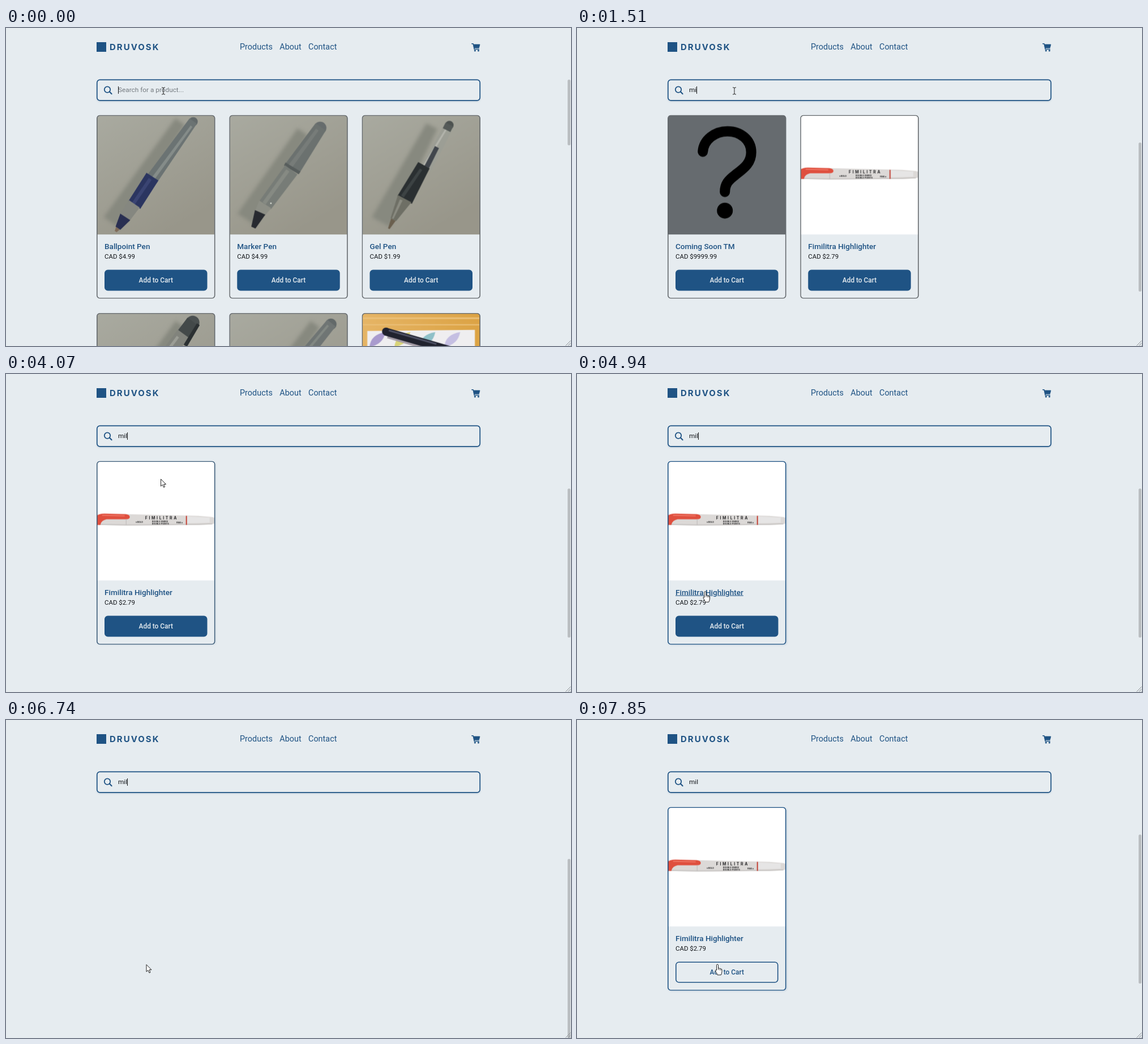
Write an HTML page with a canvas that moves like this. It is 998 px wide and 561 px high and loops after 8 s.

```html
<!DOCTYPE html>
<html lang="en">
<head>
<meta charset="utf-8">
<title>Pen shop search</title>
<style>
  :root { --bg: #e6ecf0; --blue: #1f5384; --grey: #656a6e; }
  html, body { margin: 0; width: 100%; height: 100%; overflow: hidden; background: var(--bg); }
  body { position: relative; font-family: Roboto, Arial, sans-serif; color: #111418; }
  body > *, .card > * { position: absolute; white-space: nowrap; }
  .mark { left: 160px; top: 25px; width: 17px; height: 17px; background: var(--blue); }
  .brand { left: 183px; top: 24px; font: 700 15px/20px Inter, sans-serif; letter-spacing: 2px; color: var(--blue); }
  nav { left: 413px; top: 24px; font-size: 14.45px; line-height: 20px; color: var(--blue); }
  nav span { margin-right: 12.3px; float: left; }
  .search { left: 160px; top: 91px; width: 678px; height: 37px; border-radius: 6px; box-shadow: 0 2px 3px rgba(31, 83, 132, .16); }
  .field { left: 198px; top: 103px; height: 13px; display: flex; align-items: center; font-size: 11.8px; line-height: 13px; }
  .caret { width: 1px; height: 13px; margin-right: -1px; background: #111; }
  .hint { color: #757b80; }
  .card { left: 0; top: 0; width: 209.5px; height: 324px; border-radius: 6px; }
  .card canvas { left: 1px; top: 1px; border-radius: 5px 5px 0 0; }
  .name { left: 14px; top: 220.5px; font-size: 13.56px; font-weight: 500; line-height: 20px; color: var(--blue); }
  .price { left: 14px; top: 238.5px; font-size: 11.43px; line-height: 20px; }
  .add { left: 14px; width: 181.5px; top: 273px; color: var(--bg); font-size: 11.88px; font-weight: 500; line-height: 36px; text-align: center; }
  .edge { fill: none; stroke: var(--grey); stroke-width: 1.6; }
  .button { fill: var(--blue); stroke: var(--blue); stroke-width: 1.6; }
  .thumb { left: 992px; width: 5px; border-radius: 2.5px; background: #babec1; }
  svg { left: 0; top: 0; }
</style>
</head>
<body>
<div class="mark"></div>
<div class="brand">DRUVOSK</div>
<nav><span>Products</span><span>About</span><span>Contact</span></nav>
<div class="search"></div>
<div class="field"><span class="typed"></span><i class="caret"></i><span class="hint">Search for a product...</span></div>
<div class="thumb"></div>
<svg id="icons" width="998" height="561" fill="none">
  <g stroke="#1f5384" stroke-linecap="round">
    <rect x="160.8" y="91.4" width="676.4" height="36.4" rx="5" stroke-width="1.7"/>
    <circle cx="179" cy="108.6" r="5.2" stroke-width="1.8"/>
    <path d="M183 112.6L186.6 116.2" stroke-width="2.1"/>
    <path d="M822.8 27.8H825.2L827.3 37.6H835.4" stroke-width="1.5" stroke-linejoin="round"/>
    <path d="M826 29H837L835.4 35.2H827.2Z" fill="#1f5384" stroke-width=".8" stroke-linejoin="round"/>
    <circle cx="828.3" cy="40" r="1.1" fill="#1f5384"/>
    <circle cx="834.4" cy="40" r="1.1" fill="#1f5384"/>
  </g>
  <path d="M988.5 560.5L997.5 551.5M992.5 560.5L997.5 555.5M996 560.5L997.5 559" stroke="#8b9094"/>
  <g class="pointer" id="beam" stroke="#222" stroke-width="1">
    <path d="M-3 -6H-1L0 -5L1 -6H3M0 -5V5M-3 6H-1L0 5L1 6H3"/>
  </g>
  <g class="pointer" id="arrow" fill="#fff" stroke="#222" stroke-linejoin="round">
    <path d="M0 0V12.6L2.9 9.9L5 14.6L7 13.7L5 9.2H9Z"/>
  </g>
  <g class="pointer" id="hand" fill="#fff" stroke="#222" stroke-linejoin="round">
    <path d="M-1.5 1.2Q-1.5 -.4 0 -.4Q1.5 -.4 1.5 1.2V6.5Q3.8 5.7 4 7Q5.9 6.4 6.2 7.8Q8 7.3 8 9V12Q7.8 15 6.3 18.3H0Q-.8 15.3 -3.2 11.6Q-4 9.6 -2.7 9.2Q-2 9.4 -1.5 10.3Z"/>
    <path d="M1.5 6.5V9.5M4 7.2V10M6.2 8V10.3" stroke-width=".8"/>
  </g>
</svg>
<script>
const $ = s => document.querySelector(s);
const LOOP = 8000;

// Tapered bar from (x1,y1) to (x2,y2)
function bar(c, color, x1, y1, w1, x2, y2, w2) {
  const a = Math.atan2(y2 - y1, x2 - x1) + Math.PI / 2;
  const u = Math.cos(a) / 2, v = Math.sin(a) / 2;
  c.fillStyle = color;
  c.beginPath();
  c.moveTo(x1 + u * w1, y1 + v * w1);
  c.lineTo(x2 + u * w2, y2 + v * w2);
  c.lineTo(x2 - u * w2, y2 - v * w2);
  c.lineTo(x1 - u * w1, y1 - v * w1);
  c.fill();
}

function disc(c, color, x, y, r) {
  c.fillStyle = color;
  c.beginPath();
  c.arc(x, y, r, 0, 7);
  c.fill();
}

function shape(c, color, path) {
  c.fillStyle = color;
  c.fill(new Path2D(path));
}

function flood(c, color) {
  c.fillStyle = color;
  c.fillRect(-1, -1, 210, 212);
}

function fade(c, x, y, from, to) {
  const g = c.createLinearGradient(0, 0, x, y);
  g.addColorStop(0, from);
  g.addColorStop(1, to);
  flood(c, g);
}

function desk(c, x1, y1, x2, y2, w) {
  fade(c, 120, 210, '#a9aaa0', '#98968a');
  c.filter = 'blur(3px)';
  bar(c, '#87897f', x1, y1, w * .6, x2, y2, w);
  c.filter = 'none';
}

const ballpoint = c => {
  desk(c, 146, 10, 25, 188, 34);
  disc(c, '#62696a', 169, 10, 8);
  bar(c, '#6b7373', 169, 9, 16, 95, 113, 22);
  bar(c, '#858c89', 166, 18, 4, 97, 112, 6);
  bar(c, '#2b3560', 97, 107, 25, 65, 157, 25);
  bar(c, '#3a4472', 93, 111, 6, 63, 155, 6);
  bar(c, '#858780', 65, 155, 23, 47, 181, 20);
  bar(c, '#292f52', 49, 178, 21, 36, 198, 10);
  bar(c, '#806c5a', 36, 198, 8, 32, 204, 4);
};

const marker = c => {
  desk(c, 128, 28, 28, 182, 36);
  disc(c, '#666c6d', 159, 21, 11);
  bar(c, '#6b716f', 160, 19, 22, 109, 94, 30);
  bar(c, '#777c79', 154, 24, 6, 104, 92, 8);
  bar(c, '#575d5c', 111, 90, 31, 108, 95, 30);
  bar(c, '#777c77', 108, 95, 27, 62, 157, 25);
  bar(c, '#868a83', 102, 96, 7, 60, 154, 7);
  bar(c, '#8d8f86', 62, 156, 25, 52, 172, 19);
  bar(c, '#272a30', 53, 170, 20, 41, 197, 8);
  disc(c, '#eef0e8', 72, 154, 1.3);
};

const gel = c => {
  desk(c, 122, 18, 32, 187, 36);
  bar(c, '#9c9e95', 152, 18, 16, 112, 92, 20);
  bar(c, '#b3b4ac', 148, 22, 3, 108, 88, 4);
  bar(c, '#41464c', 131, 55, 8, 113, 90, 9);
  disc(c, '#4d5250', 153, 16, 7.5);
  bar(c, '#555a58', 153, 15, 15, 148, 25, 15);
  bar(c, '#2a2f31', 108, 87, 23, 74, 148, 29);
  bar(c, '#3d4344', 103, 94, 5, 70, 142, 6);
  bar(c, '#6e6f65', 74, 146, 27, 54, 183, 11);
  bar(c, '#8a8b81', 68, 148, 5, 53, 181, 3);
  bar(c, '#6a5f4e', 54, 183, 9, 46, 199, 3);
};

const click = c => {
  desk(c, 146, 18, 35, 180, 32);
  bar(c, '#81837c', 155, 30, 24, 58, 160, 24);
  bar(c, '#9b9d95', 142, 40, 5, 54, 158, 5);
  disc(c, '#4a5050', 168, 15, 12);
  bar(c, '#434949', 169, 14, 25, 153, 36, 26);
  bar(c, '#2b3032', 178, 18, 6, 155, 56, 7);
  bar(c, '#2a2f31', 58, 160, 24, 36, 196, 6);
};

const metal = c => {
  desk(c, 150, 18, 30, 186, 32);
  disc(c, '#626969', 178, 18, 10);
  bar(c, '#6f7574', 179, 16, 19, 60, 162, 26);
  bar(c, '#828883', 173, 20, 4, 58, 158, 6);
  bar(c, '#2b2f33', 60, 162, 24, 36, 196, 6);
};

const brush = c => {
  fade(c, 206, 30, '#e6b566', '#dca344');
  shape(c, '#ebc078', 'M0 6H206V9H0ZM0 18H206V20H0Z');
  shape(c, '#efeef0', 'M8 30L198 28V210H8Z');
  ['#a99bce', '#d9d479', '#8fc0c8', '#c5bfe2'].forEach((color, i) => {
    for (let k = 0; k < 4; k++) {
      const x = 12 + i * 44 + k * 8, y = 42 + k * 38;
      shape(c, color, `M${x} ${y + 16}Q${x + 2} ${y - 6} ${x + 28} ${y - 10}Q${x + 24} ${y + 12} ${x} ${y + 16}Z`);
    }
  });
  bar(c, '#a49ca6', 44, 39, 8, 186, 80, 10);
  disc(c, '#20222e', 41, 31, 7);
  bar(c, '#20222e', 40, 31, 14, 186, 73, 14);
  bar(c, '#4c4f63', 46, 29, 3, 130, 53, 3);
};

const mystery = c => {
  flood(c, '#666b6f');
  c.lineWidth = 18;
  c.lineCap = 'round';
  c.strokeStyle = '#000';
  c.stroke(new Path2D('M60.5 63C62 42 82 27 104 27C128 27 146 43 146 64C146 84 132 93 118 104C106 113 99.5 120 99.5 134'));
  disc(c, '#000', 99.5, 167, 14);
};

const highlighter = c => {
  flood(c, '#fff');
  shape(c, '#dcd9d7', 'M-1 93L50 92L178 95L202 97Q206 98 208 99V108Q206 109 202 110L178 111L50 112L-1 111Z');
  shape(c, '#c9c6c4', 'M-1 109L50 110L178 109L203 108L202 110L178 111L50 112L-1 111Z');
  shape(c, '#e6e5e5', 'M158 96L198 98V107L158 108Z');
  shape(c, '#df4f3e', 'M-1 95Q2 91 12 91L50 92Q57 93 57 97Q57 101 50 101H16Q6 103 5 111H-1Z');
  shape(c, '#ee7463', 'M8 93L48 94V96L8 95Z');
  c.fillStyle = '#c4453a';
  c.fillRect(156, 95, 2, 16);
  c.fillStyle = '#bdbab8';
  c.fillRect(50, 101, 1, 10);
  c.fillStyle = '#2b2b2d';
  c.font = '700 7px Inter, sans-serif';
  c.letterSpacing = '2.6px';
  c.fillText('FIMILITRA', 84, 101.5);
  c.letterSpacing = '0px';
  c.font = '700 4px Roboto, sans-serif';
  c.fillText('DOUBLE ENDED', 96, 106.5);
  c.fillText('DOUBLE POINTS', 96, 110);
  c.fillText('◂ BOLD', 67, 107.5);
  c.fillText('FINE ▸', 139, 108);
};

const products = [
  ['Ballpoint Pen', '4.99', ballpoint],
  ['Marker Pen', '4.99', marker],
  ['Gel Pen', '1.99', gel],
  ['Click Pen', '2.99', click],
  ['Metal Pen', '5.99', metal],
  ['Brush Marker', '3.49', brush],
  ['Coming Soon TM', '9999.99', mystery],
  ['Fimilitra Highlighter', '2.79', highlighter]
].map(([name, price, draw]) => {
  const card = document.createElement('div');
  card.className = 'card';
  card.innerHTML = `<canvas width="208" height="210"></canvas>
    <svg width="210" height="324">
      <rect class="edge" x=".8" y=".8" width="207.9" height="322.4" rx="5"/>
      <rect class="button" x="14.8" y="273.8" width="179.9" height="35.4" rx="5"/>
    </svg>
    <div class="name">${name}</div><div class="price">CAD $${price}</div><div class="add">Add to Cart</div>`;
  $('#icons').before(card);
  const c = card.querySelector('canvas').getContext('2d');
  c.translate(.7, .7);
  draw(c);
  return { key: name.toLowerCase(), card };
});

const typing = [[0, ''], [60, 'm'], [1390, 'mi'], [2100, 'mil'], [6250, 'mila'], [6740, 'mil']];
// time, query, scrollbar thumb top and height
const results = [
  [0, '', 91, 116], [300, 'm', 158, 204], [1510, 'mi', 202, 263],
  [2160, 'mil', 202, 263], [6310, 'mila', 245, 316], [6800, 'mil', 202, 263]
];
const blinks = [600, 1130, 2220, 2720, 3220, 3720, 4230, 4750, 5250, 5750, 6830, 7320, 7850];
const path = [
  [0, 278, 111], [3519, 278, 111], [3520, 280, 105], [3740, 280, 105], [4560, 262, 330],
  [4600, 262, 330], [4940, 226.5, 384], [5080, 226.5, 384], [5600, 248, 431.5], [LOOP, 248, 431.5]
];

const latest = (list, t) => list.filter(s => s[0] <= t).pop();
const ramp = (t, from, to) => Math.min(1, Math.max(0, (t - from) / (to - from)));
const mix = (a, b, p) => `rgb(${a.map((v, i) => Math.round(v + (b[i] - v) * p))})`;
const BG = [230, 236, 240], BLUE = [31, 83, 132], GREY = [101, 106, 110];

function position(t) {
  const i = path.findIndex(p => p[0] > t);
  const [t0, x0, y0] = path[i - 1], [t1, x1, y1] = path[i];
  const u = ramp(t, t0, t1), s = u * u * (3 - 2 * u);
  return [x0 + (x1 - x0) * s, y0 + (y1 - y0) * s];
}

function showResults(query, top, height) {
  let n = 0;
  for (const { key, card } of products) {
    const hit = key.includes(query);
    card.style.display = hit ? '' : 'none';
    if (!hit) continue;
    card.style.transform = `translate(${160 + n % 3 * 234.25}px, ${153.5 + Math.floor(n / 3) * 349.2}px)`;
    n++;
  }
  $('.thumb').style.top = top + 'px';
  $('.thumb').style.height = height + 'px';
}

function hover(t, title) {
  const { card } = products[products.length - 1];
  const style = s => card.querySelector(s).style;
  const again = ramp(t, 6860, 7070), back = t >= 6800;
  const edge = back ? again : ramp(t, 3990, 4140);
  const press = back ? again : ramp(t, 5470, 5620);
  style('.edge').stroke = mix(GREY, BLUE, edge);
  card.style.boxShadow = `1px 1px 3px rgba(31,83,132,${.16 * edge})`;
  style('.name').textDecoration = title ? 'underline' : 'none';
  style('.button').fill = mix(BLUE, BG, press);
  style('.add').color = mix(BG, BLUE, press);
}

let shown;
function frame(now) {
  const t = now % LOOP;
  const text = latest(typing, t)[1];
  $('.typed').textContent = text;
  $('.hint').style.display = text ? 'none' : '';
  $('.caret').style.opacity = blinks.filter(b => b <= t).length % 2 ? 0 : 1;

  const state = latest(results, t);
  if (state !== shown) showResults(...(shown = state).slice(1));

  const [x, y] = position(t);
  const title = y > 376 && y < 393, button = y > 427;
  const gone = t >= 6310 && t < 6940;
  hover(t, title);
  const kind = y < 129 ? 'beam' : (title || button) && !gone ? 'hand' : 'arrow';
  for (const el of document.querySelectorAll('.pointer')) {
    el.style.display = el.id === kind ? '' : 'none';
    el.setAttribute('transform', `translate(${x} ${y})`);
  }
  requestAnimationFrame(frame);
}
requestAnimationFrame(frame);
</script>
</body>
</html>
```
